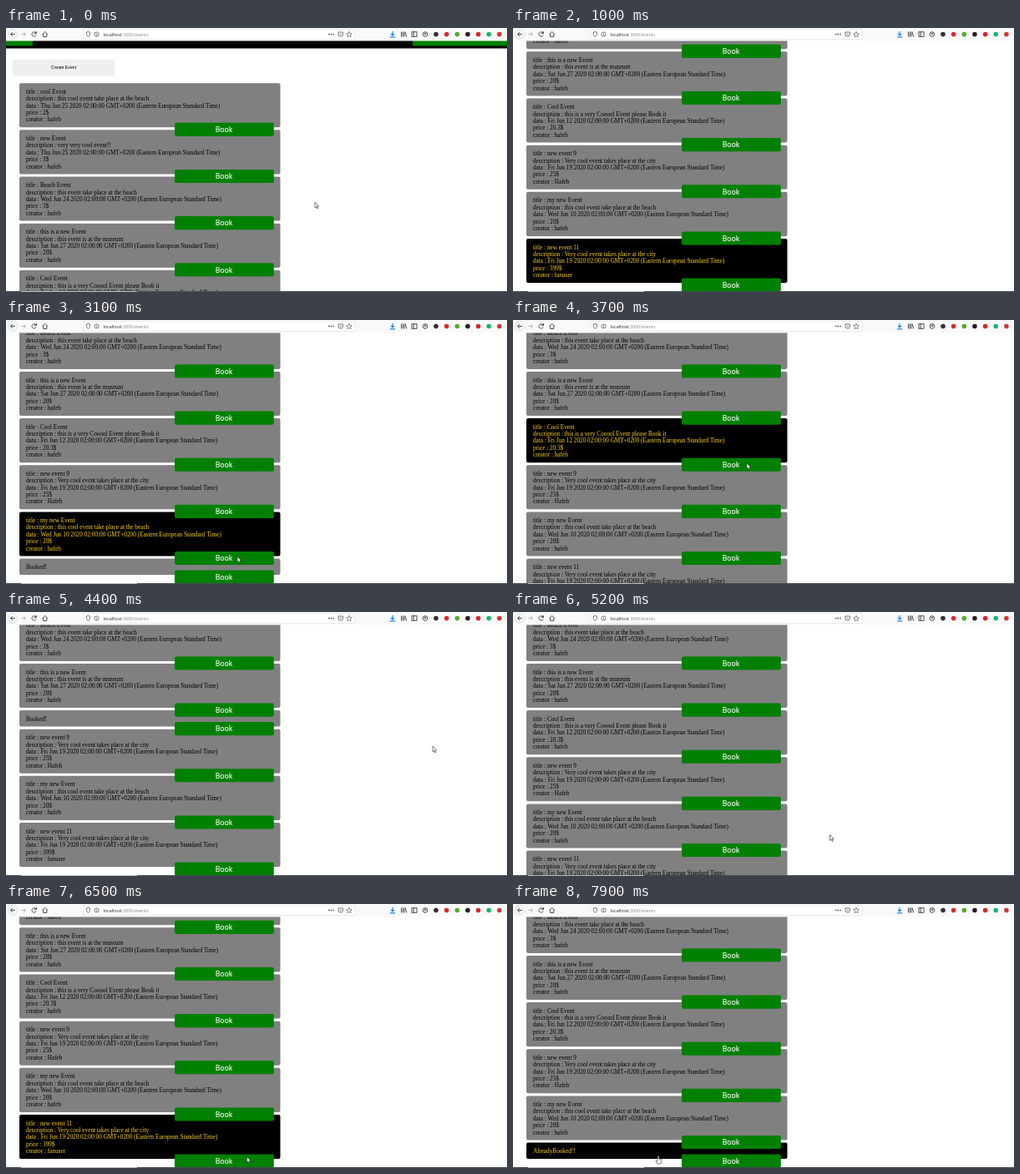
An HTML page that plays this animation: 600 px wide and 317 px high, repeating every 8 s.

```html
<!DOCTYPE html>
<html lang="en">
<head>
<meta charset="utf-8">
<title>Events</title>
<style>
  html, body { margin: 0; width: 100%; height: 100%; overflow: hidden; background: #fff; }
  svg { display: block; width: 600px; height: 317px; }
  .card text { font: 7.24px "Liberation Serif", "Times New Roman", serif; }
  .book { font: 8.6px "Open Sans", sans-serif; fill: #fff; stroke: #fff; stroke-width: .15; text-anchor: middle; }
  .create { font: 5.2px "Liberation Sans", Arial, sans-serif; text-anchor: middle; }
  .url { font: 5.3px "Open Sans", sans-serif; }
  .icon { fill: none; stroke: #3c3c40; stroke-width: .9; }
</style>
</head>
<body>
<svg viewBox="0 0 600 317">
  <rect width="600" height="317" fill="#fff"/>
  <g id="page">
    <g id="top">
      <path d="M0 10H600V24.6H0Z"/>
      <path d="M0 10H32V20Q32 21.5 30.5 21.5H0ZM487 10H600V21.5H488.5Q487 21.5 487 20Z" fill="#008000"/>
      <rect x="8" y="38" width="122" height="19.3" rx="1" fill="#efefef"/>
      <text class="create" x="69" y="49.4">Create Event</text>
    </g>
    <g id="cards"></g>
    <g id="buttons"></g>
  </g>
  <g id="toolbar">
    <rect width="600" height="15.5" fill="#f9f9fa"/>
    <rect x="93" y="1.5" width="325" height="12" rx="1" fill="#fff" stroke="#d6d6d8" stroke-width=".5"/>
    <g class="icon">
      <circle cx="8" cy="7.5" r="5.5" fill="#fff" stroke="#b4b4b6" stroke-width=".5"/>
      <path d="M11 7.5H5.5M8 5L5.5 7.5L8 10"/>
      <path d="M18 7.5H23.5M21 5L23.5 7.5L21 10" stroke="#b4b4b6"/>
      <path d="M36 6A2.7 2.7 0 1 0 36.2 8.5M36.5 4V6.5H34"/>
      <path d="M43.5 7.5L46.7 4.5L50 7.5M44.7 7V10.5H48.8V7"/>
      <path d="M96.5 5L98.5 4.3L100.5 5V7.5Q100.5 9.5 98.5 10.5Q96.5 9.5 96.5 7.5Z" stroke-width=".7"/>
      <circle cx="108.5" cy="7.5" r="2.6" stroke-width=".7"/>
      <path d="M108.5 7.2V9M108.5 5.9V6.5" stroke-width=".7"/>
      <path d="M386 7.5H393" stroke-width="1.3" stroke-dasharray="1.4 1.3"/>
      <path d="M398 5H403.5V7.5A2.75 2.75 0 0 1 398 7.5ZM399.5 7L400.75 8.2L402 7" stroke-width=".7"/>
      <path d="M411 4.3L412 6.6L414.3 6.8L412.6 8.4L413.1 10.7L411 9.5L408.9 10.7L409.4 8.4L407.7 6.8L410 6.6Z" stroke-width=".6"/>
      <path d="M463 4V8.8M461 7L463 9L465 7M460 10.8H466" stroke="#1684f8" stroke-width="1.2"/>
      <path d="M473.5 4.5V10.5M475.3 4.5V10.5M477 4.5V10.5M478 4.5L479.8 10.5"/>
      <rect x="486" y="4.7" width="6" height="5.6"/><path d="M488.2 4.7V10.3"/>
      <circle cx="502" cy="7.5" r="2.8"/><circle cx="502" cy="6.9" r=".9"/>
    </g>
    <text class="url" x="116.6" y="9.6" fill="#222">localhost<tspan fill="#85858a">:3000/events</tspan></text>
    <g id="badges"></g>
  </g>
  <rect y="316" width="600" height="1" fill="#3d4a50"/>
  <rect x="18" y="316" width="139" height="1" fill="#b4babd"/>
  <g id="cursor" stroke-linejoin="round">
    <path id="arrow" d="M0 0V6.8L1.6 5.4L2.7 7.9L3.7 7.4L2.7 5.1H4.7Z" fill="#fff" stroke="#222" stroke-width=".6"/>
    <path id="hand" d="M-.8 5V.6Q0-.4.8.6V3.3L3.7 4.2V7L2.9 9.5H-1L-2.9 6.3Q-2.6 4.7-.8 6Z" fill="#fff" stroke="#222" stroke-width=".6"/>
    <path id="beam" d="M-1.2-3.5H1.2M0-3.5V3.5M-1.2 3.5H1.2" fill="none" stroke="#000" stroke-width=".6"/>
  </g>
</svg>
<script>
const LOOP = 8000, PITCH = 56.15, FIRST = 66.2, FULL = 53.1, SHORT = 19.5;
const LINE = 8.4, BASELINE = 12.6, MAX_SCROLL = 206.3, NOTICE = 1200;
const $ = id => document.getElementById(id);

function add(parent, tag, attrs, text = '') {
  const el = document.createElementNS('http://www.w3.org/2000/svg', tag);
  for (const name in attrs) el.setAttribute(name, attrs[name]);
  el.textContent = text;
  parent.append(el);
  return el;
}

const events = [
  ['cool Event', 'this cool event take place at the beach', 'Thu Jun 25', '2$', 'hafeb'],
  ['new Event', 'very very cool event!!', 'Thu Jun 25', '3$', 'hafeb'],
  ['Beach Event', 'this event take place at the beach', 'Wed Jun 24', '3$', 'hafeb'],
  ['this is a new Event', 'this event is at the museum', 'Sat Jun 27', '20$', 'hafeb'],
  ['Cool Event', 'this is a very Cooool Event please Book it', 'Fri Jun 12', '20.3$', 'hafeb'],
  ['new event 9', 'Very cool event takes place at the city', 'Fri Jun 19', '25$', 'Hafeb'],
  ['my new Event', 'this cool event take place at the beach', 'Wed Jun 10', '20$', 'hafeb'],
  ['new event 11', 'Very cool event takes place at the city', 'Fri Jun 19', '399$', 'fanuser']
];

const cards = events.map(([title, about, day, price, creator]) => {
  const group = add($('cards'), 'g', { class: 'card' });
  const box = add(group, 'rect', { x: 16, width: 312.5, rx: 2 });
  const details = add(group, 'g', {});
  [`title : ${title}`, `description : ${about}`,
   `data : ${day} 2020 02:00:00 GMT+0200 (Eastern European Standard Time)`,
   `price : ${price}`, `creator : ${creator}`
  ].forEach((line, i) => add(details, 'text', { x: 24, y: BASELINE + i * LINE }, line));
  const message = add(group, 'text', { x: 24, y: BASELINE });
  const button = add($('buttons'), 'g', {});
  add(button, 'rect', { x: 202, width: 118.8, height: 16.1, rx: 1.8, fill: '#008000' });
  add(button, 'text', { class: 'book', x: 261, y: 11.3 }, 'Book');
  return { group, box, details, message, button };
});

['#303034', '#e0282e', '#58a82c', '#222', '#d8262c', '#18b66a', '#c83c36'].forEach((fill, i) =>
  add($('badges'), 'circle', { cx: 515 + i * 12.65, cy: 7.5, r: 2.8, fill }));

// Each booking shows its message for NOTICE ms: card index, start, message
const bookings = [
  [7, 2450, 'Booked!'],
  [4, 3900, 'Booked!'],
  [7, 6900, 'AlreadyBooked!!']
];

// Pointer path: time, x, y
const path = [
  [0, 370, 209], [400, 370, 209], [950, 265, 285], [1200, 265, 285],
  [1700, 277, 307], [2050, 277, 307], [2400, 277, 284], [3200, 277, 284],
  [3600, 280, 172], [3900, 280, 172], [4350, 511, 161], [4500, 511, 161],
  [5100, 379.5, 267.5], [5400, 379.5, 267.5], [6200, 288.5, 303.5],
  [7300, 288.5, 303.5], [7800, 174, 302.5], [LOOP, 174, 302.5]
];

const ease = (t, from, to) => {
  const p = Math.min(1, Math.max(0, (t - from) / (to - from)));
  return p * p * (3 - 2 * p);
};

function pointerAt(t) {
  const i = path.findIndex(key => key[0] > t);
  const [t0, x0, y0] = path[i - 1], [t1, x1, y1] = path[i];
  const p = ease(t, t0, t1);
  return [x0 + (x1 - x0) * p, y0 + (y1 - y0) * p];
}

// A collapsed card shortens the page, which pulls the scroll position back.
function scrollAt(t) {
  const clamped = MAX_SCROLL - (FULL - SHORT);
  if (t < bookings[0][1]) return MAX_SCROLL * ease(t, 50, 700);
  if (t < bookings[2][1]) return clamped + (MAX_SCROLL - clamped) * ease(t, 5600, 6000);
  return clamped;
}

const show = (el, on) => el.setAttribute('display', on ? 'inline' : 'none');
const move = (el, x, y) => el.setAttribute('transform', `translate(${x} ${y})`);

function render(t) {
  const scroll = scrollAt(t), [px, py] = pointerAt(t);
  const booking = bookings.find(([, start]) => t >= start && t < start + NOTICE);
  move($('top'), 0, -scroll);

  let y = FIRST - scroll, hovered = -1, shape = 'arrow', overButton = false;
  cards.forEach((card, i) => {
    const booked = booking && booking[0] === i;
    const height = booked ? SHORT : FULL;
    const buttonY = y + height - 5.5;
    move(card.group, 0, y);
    move(card.button, 0, buttonY);
    card.box.setAttribute('height', height);
    show(card.details, !booked);
    card.message.textContent = booked ? booking[2] : '';

    const onButton = px > 202 && px < 321 && py >= buttonY && py < buttonY + 16.1;
    const onCard = px > 16 && px < 328.5 && py >= y && py < y + height;
    if (onButton || (onCard && !overButton)) {
      hovered = i;
      const onText = py > y + 5 && py < y + height - 5;
      shape = onButton ? 'arrow' : booked ? 'hand' : onText ? 'beam' : 'arrow';
    }
    overButton = overButton || onButton;
    y += height + PITCH - FULL;
  });

  cards.forEach((card, i) => {
    card.box.setAttribute('fill', i === hovered ? '#000' : '#808080');
    card.group.setAttribute('fill', i === hovered ? '#ffd01c' : '#000');
  });
  for (const name of ['arrow', 'hand', 'beam']) show($(name), name === shape);
  move($('cursor'), px, py);
}

const start = performance.now();
function tick() {
  render((performance.now() - start) % LOOP);
  requestAnimationFrame(tick);
}
tick();
</script>
</body>
</html>
```
